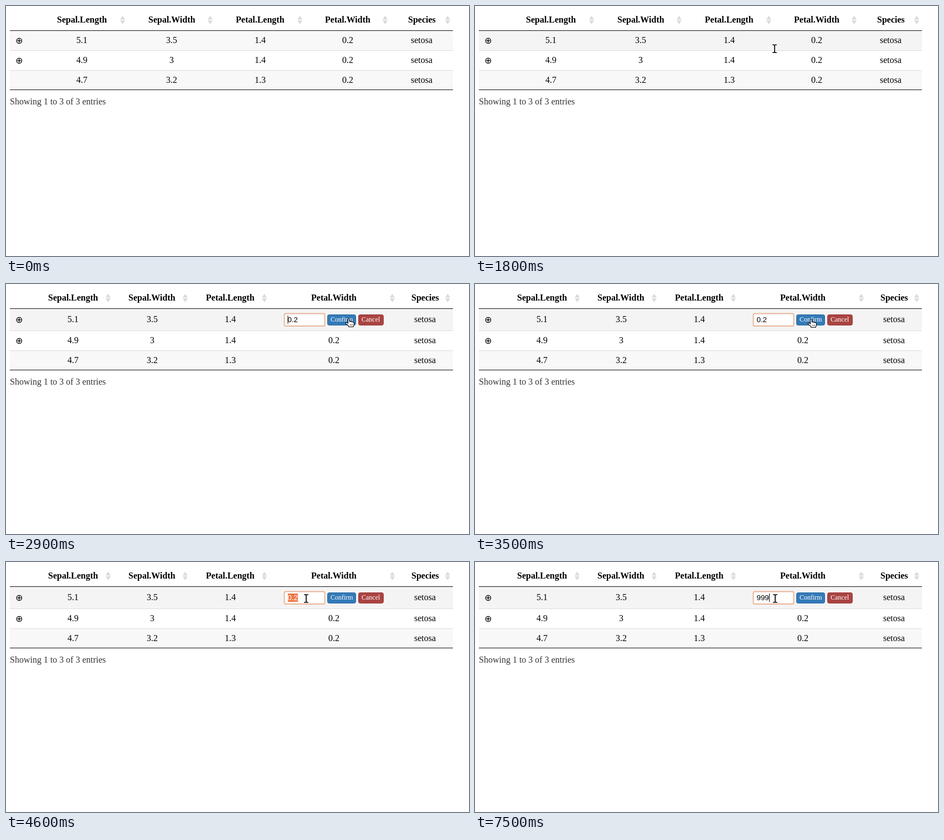
Animation, 836 px wide and 452 px high, one loop 8 s. Source, as an HTML page with a canvas:

```html
<!DOCTYPE html>
<html lang="en">
<head>
<meta charset="utf-8">
<title>Editable table</title>
<style>
html, body { margin: 0; width: 100%; height: 100%; overflow: hidden; background: #fff; }
canvas { position: absolute; left: 0; top: 0; }
span { position: absolute; white-space: pre; color: #000;
  font: 16px/18px "Liberation Serif", "Times New Roman", serif; }
.head { font-weight: bold; }
.info { color: #333; }
.plus { font-family: "DejaVu Sans", sans-serif; }
.btn { color: #fff; font-size: 12px; }
#value { left: 508.5px; top: 57px;
  font: 13.333px/15px "Liberation Sans", Arial, sans-serif; }
mark { background: #f07746; color: #fff; }
</style>
</head>
<body>
<canvas id="back" width="836" height="452"></canvas>
<div id="view"></div>
<div id="edit"><span id="value"></span></div>
<canvas id="front" width="836" height="452"></canvas>
<script>
const $ = id => document.getElementById(id);
const back = $('back').getContext('2d');
const front = $('front').getContext('2d');
const LOOP = 8000;
const heads = ['Sepal.Length', 'Sepal.Width', 'Petal.Length', 'Petal.Width', 'Species'];
const rows = [
  ['5.1', '3.5', '1.4', '0.2', 'setosa'],
  ['4.9', '3', '1.4', '0.2', 'setosa'],
  ['4.7', '3.2', '1.3', '0.2', 'setosa']
];
const layouts = {
  view: { cols: [137, 299, 459, 617, 750.5], sorts: [210.5, 368.5, 530.5, 684.5, 797.5],
    lines: [44, 80, 116, 151], base: [67, 103, 139], info: 178 },
  edit: { cols: [121, 263.5, 404.5, 591.5, 757], sorts: [184.5, 323.5, 466.5, 697.5, 797.5],
    lines: [44, 84, 120, 155], base: [69, 107, 143], info: 182 }
};

// Centres text on cx, starting on a whole pixel.
function label(parent, text, cx, base, cls = '') {
  const s = document.createElement('span');
  s.textContent = text;
  s.className = cls;
  parent.append(s);
  s.style.left = Math.round(cx - s.getBoundingClientRect().width / 2) + 'px';
  s.style.top = base - 14 + 'px';
}

function buildText(name) {
  const box = $(name), { cols, base, info } = layouts[name];
  heads.forEach((h, i) => label(box, h, cols[i], 30, 'head'));
  rows.forEach((row, r) => {
    if (r < 2) label(box, '⊕', 24, base[r] + 1, 'plus');
    row.forEach((v, i) => {
      if (name === 'view' || r || i !== 3) label(box, v, cols[i], base[r]);
    });
  });
  label(box, 'Showing 1 to 3 of 3 entries', 93.6, info, 'info');
  if (name === 'edit') {
    label(box, 'Confirm', 606, 69, 'btn');
    label(box, 'Cancel', 659, 69, 'btn');
  }
}

function rect(color, x, y, w, h) {
  back.fillStyle = color;
  back.fillRect(x, y, w, h);
}

function round(x, y, w, h, r, fill, stroke, width = 1) {
  back.beginPath();
  back.roundRect(x, y, w, h, r);
  back.fillStyle = fill;
  back.fill();
  back.strokeStyle = stroke;
  back.lineWidth = width;
  back.stroke();
}

function triangle(x, base, tip) {
  back.beginPath();
  back.moveTo(x - 4.5, base);
  back.lineTo(x + 4.5, base);
  back.lineTo(x, tip);
  back.fill();
}

function drawTable(name, hover) {
  const { lines, sorts } = layouts[name];
  rect('#fff', 0, 0, 836, 452);
  rect(hover ? '#f4f4f4' : '#f8f8f8', 7, 45, 800, lines[1] - 45);
  rect('#f8f8f8', 7, lines[2], 800, lines[3] - lines[2]);
  lines.forEach((y, i) => rect(i % 3 ? '#ddd' : '#111', 7, y, 800, 1));
  back.fillStyle = '#dadada';
  for (const x of sorts) {
    triangle(x, 24.5, 17.5);
    triangle(x, 26, 33);
  }
  if (name === 'edit') {
    round(502.5, 53.5, 73, 22.5, 2.5, '#fff', '#eab698', 2);
    round(580.5, 55.5, 51, 19, 3, '#337ab7', '#2e6da4');
    round(636.5, 55.5, 45, 19, 3, '#a94442', '#a23c3a');
  }
}

const handPath = new Path2D('M4.5 9V2Q4.5 .5 5.8 .5T7.2 2V5.8Q8.5 4.9 9.6 6.1' +
  'Q11 5.4 12 6.7Q13.4 6.2 14.3 7.2Q15.5 7.6 15.5 9V11.5L14 15.5H6L5.2 13.3' +
  'L.7 9.6Q-.3 7.5 1.6 7.2Q2.9 7.2 4.5 9Z');
const ridges = new Path2D('M8.5 10.5V13.5M10.5 10.5V13.5M12.5 10.5V13.5');
const beamPath = new Path2D('M-3 -7H-1L0 -6L1 -7H3M0 -6V6M-3 7H-1L0 6L1 7H3');

function drawCursor({ x, y, hand }) {
  front.save();
  if (hand) {
    front.translate(x - 8, y - 8);
    front.fillStyle = '#fff';
    front.fill(handPath);
    front.strokeStyle = '#000';
    front.lineWidth = 1.1;
    front.stroke(handPath);
    front.lineWidth = .6;
    front.stroke(ridges);
  } else {
    front.translate(x, y + .5);
    front.lineCap = 'square';
    for (const [color, width] of [['#fff', 3.6], ['#000', 1.7]]) {
      front.strokeStyle = color;
      front.lineWidth = width;
      front.stroke(beamPath);
    }
  }
  front.restore();
}

const curve = (a, b, c, u) => (1 - u) ** 2 * a + 2 * u * (1 - u) * b + u * u * c;

// The pointer is sampled ten times a second.
function pointer(t) {
  const n = Math.floor(t / 100);
  if (n < 14) return null;
  if (n < 23) {
    const u = (n - 14) / 8, y = curve(42, 98, 69, u);
    return { x: 466 + 150 * u * u * (3 - 2 * u), y, hand: y < 50 };
  }
  if (n < 24) return { x: 619, y: 66 };
  if (n < 29) return { x: 620, y: 65 };
  if (n < 34) return { x: 621, y: 70, hand: true };
  const [x, y] = [[623, 71], [609, 71], [579, 69], [552, 67], [542, 65.5]][Math.min(n - 34, 4)];
  return { x, y, hand: x > 580 };
}

// Field content: selected part, plain part and caret position.
function field(t) {
  if (t < 3400) return ['', '0.2', 508.5];
  if (t < 4100) return ['', '0.2', 0];
  if (t < 4400) return ['0', '.2', 0];
  if (t < 6300) return ['0.2', '', 0];
  if (t < 6900) return ['', '9', 516];
  if (t < 7500) return ['', '9', 0];
  return ['', '999', 531];
}

let last = '';
function frame() {
  const t = performance.now() % LOOP;
  const editing = t >= 2900;
  const p = pointer(t);
  const name = editing ? 'edit' : 'view';
  const hover = editing || !!p && !p.hand;
  const [marked, plain, caret] = field(t);
  const key = [name, hover, marked, plain].join();
  if (key !== last) {
    last = key;
    drawTable(name, hover);
    $('view').hidden = editing;
    $('edit').hidden = !editing;
    const mark = document.createElement('mark');
    mark.textContent = marked;
    $('value').replaceChildren(mark, plain);
  }
  front.clearRect(0, 0, 836, 452);
  if (editing && caret) {
    front.fillStyle = '#000';
    front.fillRect(caret, 57, 1, 15);
  }
  if (p) drawCursor(p);
  requestAnimationFrame(frame);
}

buildText('view');
buildText('edit');
frame();
</script>
</body>
</html>
```
